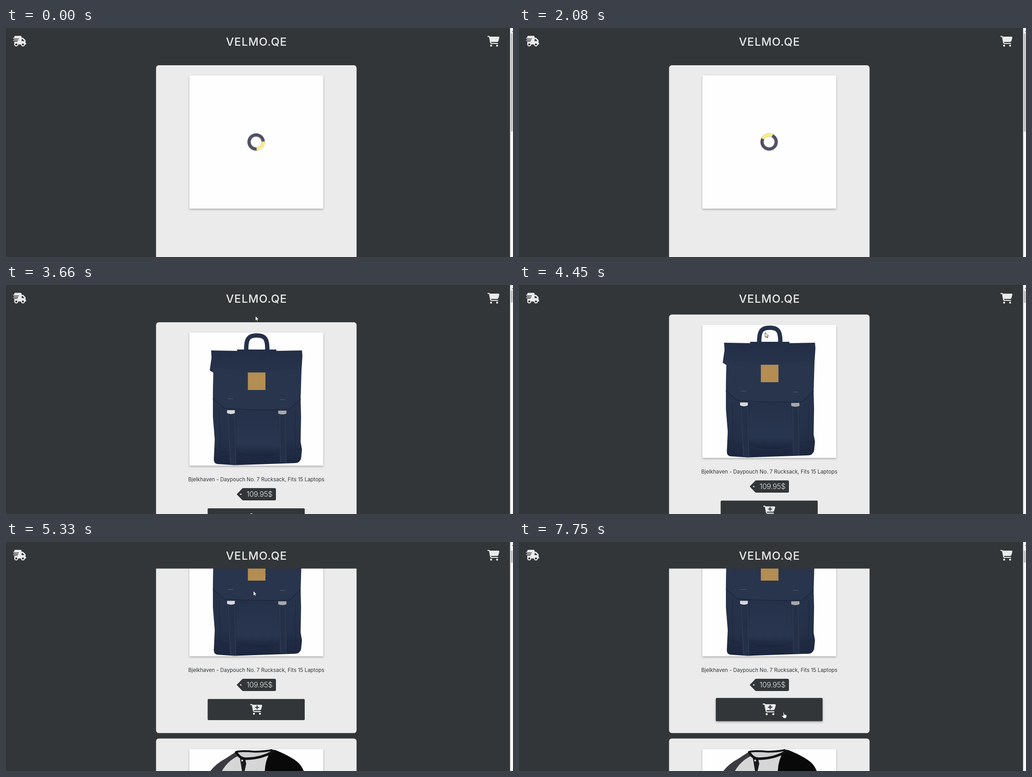
An HTML page for the animation above (8 s loop, 1110 px wide and 504 px high).

```html
<!DOCTYPE html>
<html lang="en">
<head>
<meta charset="utf-8">
<title>Store</title>
<style>
  html, body { margin: 0; width: 100%; height: 100%; overflow: hidden; background: #323638; }
  svg { display: block; }
  text { font-family: Inter, "Open Sans", sans-serif; text-anchor: middle; }
  .photo { fill: #fefefe; filter: drop-shadow(0 2px 2px rgba(0, 0, 0, .28)); }
  .dark { fill: #323638; }
  .light { fill: #ebebeb; }
  .line { fill: none; stroke-linecap: round; }
</style>
</head>
<body>
<svg width="1110" height="504" viewBox="0 0 1110 504">
  <defs>
    <linearGradient id="cloth" x2="0" y2="1">
      <stop offset="0" stop-color="#222e46"/>
      <stop offset=".25" stop-color="#29354c"/>
      <stop offset=".8" stop-color="#243047"/>
      <stop offset="1" stop-color="#1b263e"/>
    </linearGradient>
    <linearGradient id="pocket" x2="0" y2="1">
      <stop offset="0" stop-color="#253149"/>
      <stop offset=".75" stop-color="#29364f"/>
      <stop offset="1" stop-color="#1a253d"/>
    </linearGradient>
    <clipPath id="shirtClip"><rect x="401.5" y="602" width="293" height="60"/></clipPath>
    <g id="cart">
      <path d="M0 24C0 10.7 10.7 0 24 0H69.5c22 0 41.5 12.8 50.6 32h411c26.3 0 45.5 25 38.6 50.4l-41 152.3c-8.5 31.4-37 53.3-69.5 53.3H170.7l5.4 28.5c2.2 11.3 12.1 19.5 23.6 19.5H488a24 24 0 0 1 0 48H199.7c-34.6 0-64.3-24.6-70.7-58.5L77.4 54.5c-.7-3.8-4-6.5-7.9-6.5H24C10.7 48 0 37.3 0 24z"/>
      <circle cx="176" cy="464" r="48"/>
      <circle cx="464" cy="464" r="48"/>
    </g>
  </defs>

  <g id="page">
    <rect class="light" x="328.5" y="82" width="439" height="484.5" rx="6"/>
    <rect class="photo" x="401.5" y="104.5" width="293" height="293"/>
    <g id="spinner" fill="none" stroke="#505166" stroke-width="7.2">
      <circle cx="547.6" cy="250.8" r="15.5"/>
      <circle id="arc" cx="547.6" cy="250.8" r="15.5" stroke="#fbea8c" pathLength="4" stroke-dasharray="1 3"/>
    </g>

    <g id="product">
      <g id="bag">
        <path d="M526 145C525 117 532 111 549 111S573 117 572 145" fill="none" stroke="#24314a" stroke-width="9.5"/>
        <path fill="url(#cloth)" d="M449 144L506 145V142H592V145L648 144L649 156L647 187L645 250L646 290L645 345L648 362L646 382Q643 392 632 392L500 396.500L463 394Q455 393 455 384L457 340L453 290V240L454 193L446 188L450 160Z"/>
        <path fill="#29364e" d="M453 180L454 193L453 248L478 271L620 274L645 251L646 184Q548 200 453 180Z" opacity=".75"/>
        <path fill="url(#pocket)" d="M503 275H596L600 362Q598 376 550 377Q503 377 502 360Z"/>
        <g class="line" stroke="#1b263d">
          <path d="M453 250L478 271Q550 277 620 274L645 251" stroke-width="1.4"/>
          <path d="M503 279V358Q505 376 550 377T600 360V279M457 362L486 369M613 366L645 360M467 275L469 385M634 275L633 382"/>
          <path d="M486 250.500h11M600 252.500h11" stroke="#56627a" stroke-dasharray="3 1"/>
        </g>
        <path fill="#243048" d="M484 283H501L504 396H490Z"/>
        <path fill="#243048" d="M596 284H613L614 392H600Z"/>
        <path d="M486 285L492 394M501 285L503 394M599 286L601 390M611 286L613 390" stroke="#364259"/>
        <path fill="#d8d8d6" d="M484 275.500H501V282Q493 286 484 282Z"/>
        <path fill="#a7a8ab" d="M596 276.500H614V283Q605 287 596 283Z"/>
        <rect x="529.5" y="192.500" width="38.500" height="38.500" fill="#b48d53"/>
      </g>
      <text class="dark" x="548" y="432" font-size="11.4">Bjelkhaven - Daypouch No. 7 Rucksack, Fits 15 Laptops</text>
      <path class="dark" d="M505 460.500L517 448Q518 447 520 447H588Q591 447 591 450V471Q591 474 588 474H520Q518 474 517 473Z"/>
      <circle class="light" cx="514" cy="460.500" r="1.600"/>
      <text class="light" x="555" y="466.300" font-size="16" font-weight="300" letter-spacing="-.35">109.95$</text>
      <g id="button">
        <rect class="dark" id="plate" x="441.500" y="491.500" width="212.500" height="46.500" rx="2"/>
        <g class="light" transform="translate(534.700 502.700) scale(.0458)">
          <use href="#cart"/>
          <path d="M252 160H404M328 84V236" class="line" stroke="#323638" stroke-width="48"/>
        </g>
      </g>
    </g>

    <rect class="light" x="328.5" y="578.5" width="439" height="484" rx="6"/>
    <rect class="photo" x="401.5" y="602" width="293" height="293"/>
    <g clip-path="url(#shirtClip)">
      <path fill="#d6d6d7" d="M506 612L465 652V670H572L585 608Q545 618 506 612Z"/>
      <path fill="#3a3a40" d="M440 662Q452 638 480 623L503 608L508 617Q480 630 467 662Z"/>
      <path fill="#09090a" d="M580 605L590 604Q622 617 638 630Q650 640 656 662H567Q564 632 580 605Z"/>
      <path fill="#cfcfd0" d="M506 607Q545 606 582 605Q556 622 517 623Z"/>
      <path fill="#1b1b1e" d="M512 621H523L526 634L522 652H517Z"/>
      <path class="line" stroke="#111113" stroke-width="5.500" d="M504 609Q512 623 526 623Q562 622 586 606"/>
      <path class="line" stroke="#111113" stroke-width="4" d="M504 608Q514 605 545 607.500Q568 607 582 604"/>
      <circle cx="517" cy="627" r="2" fill="#e6e6e6"/>
    </g>
  </g>

  <rect class="dark" width="1104" height="58.500"/>
  <g transform="translate(15.200 17.200) scale(.0455)">
    <path class="light" d="M64 48Q64 0 112 0H368Q416 0 416 48V96H467Q493 96 512 115L589 192Q608 211 608 237V352A32 32 0 0 1 608 416H64Z"/>
    <path class="line" stroke="#ebebeb" stroke-width="32" d="M16 112H80M48 176H80M16 240H80"/>
    <path class="line" stroke="#323638" stroke-width="32" d="M64 144H272M64 208H240M64 272H208"/>
    <path class="dark" d="M416 160H467L544 237V256H416Z"/>
    <g class="light"><circle cx="160" cy="416" r="96"/><circle cx="480" cy="416" r="96"/></g>
    <g class="dark"><circle cx="160" cy="416" r="48"/><circle cx="480" cy="416" r="48"/></g>
  </g>
  <text class="light" x="548.500" y="38.500" font-size="24.500" font-weight="500" letter-spacing="1">VELMO.QE</text>
  <use class="light" href="#cart" transform="translate(1054 17.500) scale(.0458)"/>

  <rect x="1103.600" width="6.400" height="504" fill="#f8f8f8"/>
  <path d="M1107 9l2-3 1 1v2z" fill="#8a8a8a"/>
  <rect id="thumb" x="1105" width="4.500" fill="#c1c1c1"/>

  <g id="parcel">
    <path d="M-37 -37H16L37 -16V37H-15L-37 16Z"/>
    <path fill="#ead0b3" d="M-32 -32H14L32 -14H-14Z"/>
    <path fill="#d3ab82" d="M-33 -31L-14 -13V32L-33 14Z"/>
    <path fill="#b58e61" d="M-14 -14H33V33H-14Z"/>
    <path fill="#b9c4c8" d="M-13 -32H-4L14 -14V-9H5V-14Z"/>
    <path fill="#f3f3f3" d="M-29 -2L-16 11V28L-29 15Z"/>
    <path fill="#e3120b" d="M-26 5L-18 12V22L-26 15Z"/>
    <path stroke="#222" stroke-width="2.500" d="M22 20H28M16 26H28"/>
  </g>

  <g id="cursor" fill="#fff" stroke="#222" stroke-width=".9" stroke-linejoin="round">
    <path id="arrow" d="M0 0V11L2.500 8.700L4.200 12.300L5.800 11.600L4.200 8.100H7.500Z"/>
    <path id="hand" d="M-1 1Q0 -.5 1 1V5Q3 4 4 5.500Q6 5 6.500 7V10L5 13.500H0L-4 8.500Q-4 6.500 -2 7.500L-1 8Z"/>
  </g>
</svg>
<script>
const LOOP = 8000, LOADED = 2220;
const $ = id => document.getElementById(id);
const set = (id, attrs) => { for (const k in attrs) $(id).setAttribute(k, attrs[k]); };
const clamp = v => Math.max(0, Math.min(1, v));

// Monotone cubic through [time, value] keys, held flat outside them.
function track(t, keys, col = 1) {
  const last = keys.length - 1;
  if (t <= keys[0][0]) return keys[0][col];
  if (t >= keys[last][0]) return keys[last][col];
  const slope = i => (keys[i + 1][col] - keys[i][col]) / (keys[i + 1][0] - keys[i][0]);
  const tangent = i => {
    if (i < 1 || i >= last) return 0;
    const a = slope(i - 1), b = slope(i);
    return a * b > 0 ? 2 * a * b / (a + b) : 0;
  };
  const i = keys.findIndex(k => k[0] > t) - 1;
  const d = keys[i + 1][0] - keys[i][0], u = (t - keys[i][0]) / d, v = 1 - u;
  return keys[i][col] * v * v * (1 + 2 * u) + keys[i + 1][col] * u * u * (3 - 2 * u)
    + d * u * v * (tangent(i) * v - tangent(i + 1) * u);
}

const scrollKeys = [[4330, 0], [4450, 17], [4570, 73], [4970, 73], [5090, 95], [5210, 143], [5330, 146]];
const hoverKeys = [[3180, 0], [3320, 1], [3420, 1], [3560, 0], [5480, 0], [5600, .5], [5960, 1]];
const flyKeys = [[6500, 0], [6740, .083], [7220, .643], [7340, .854], [7480, 1]];
const mouseKeys = [
  [3060, 318, 430], [3300, 448, 496], [3420, 510, 490], [3540, 546, 290], [3660, 546, 68], [3790, 539, 104.500],
  [4570, 539, 104.500], [5210, 541.500, 107.500], [5330, 541.500, 107.500], [5450, 575, 292],
  [5600, 586, 446], [5720, 580, 378], [5840, 579.500, 374.500]
];

// The screen refreshes every 120 ms, with a few longer beats.
const beats = [0, 860, 1120, 2220, 3060, 3790, 4450, 5090, 5600, 6500, 7480, 7630];
function refresh(t) {
  const beat = beats.filter(b => b <= t).pop();
  return beat + Math.floor((t - beat) / 120) * 120;
}

function draw(t) {
  const loaded = t >= LOADED, shown = loaded ? clamp((t - LOADED + 120) / 600) : 0;
  const scroll = track(t, scrollKeys), hover = track(t, hoverKeys);
  set("page", { transform: `translate(0 ${-scroll})` });

  const turn = (t / 602 + .409) % 1;
  set("arc", { transform: `rotate(${225 + 360 * turn * turn * (3 - 2 * turn)} 547.6 250.8)` });
  set("spinner", { opacity: 1 - shown });
  set("product", { opacity: +loaded });
  set("bag", { opacity: shown });
  set("thumb", { y: 12 + scroll * .048, height: loaded ? 26.500 : 216 });

  set("button", { transform: `translate(547.7 514.7) scale(${1 + .1 * hover}) translate(-547.7 -514.7)` });
  $("plate").style.filter = hover ? `drop-shadow(0 2px 2px rgba(0,0,0,${.3 * hover}))` : "none";

  const x = track(t, mouseKeys), y = track(t, mouseKeys, 2), py = y + scroll;
  const over = x > 441 && x < 654 && py > 490 && py < 540;
  set("cursor", { transform: `translate(${x} ${y})`, opacity: +(t >= 3060) });
  set("arrow", { opacity: +!over });
  set("hand", { opacity: +over });

  const p = track(t, flyKeys), pop = .86 + .14 * clamp((t - 6500) / 200);
  const size = (78.600 - 64.600 * p) / 74 * pop;
  set("parcel", {
    transform: `translate(${547.5 + 524.5 * p} ${283.5 - 259.5 * p}) scale(${size})`,
    opacity: t < 6500 ? 0 : 1 - clamp((t - 7480) / 240)
  });
}

const start = performance.now();
function tick() {
  draw(refresh((performance.now() - start + 6) % LOOP));
  requestAnimationFrame(tick);
}
tick();
</script>
</body>
</html>
```
